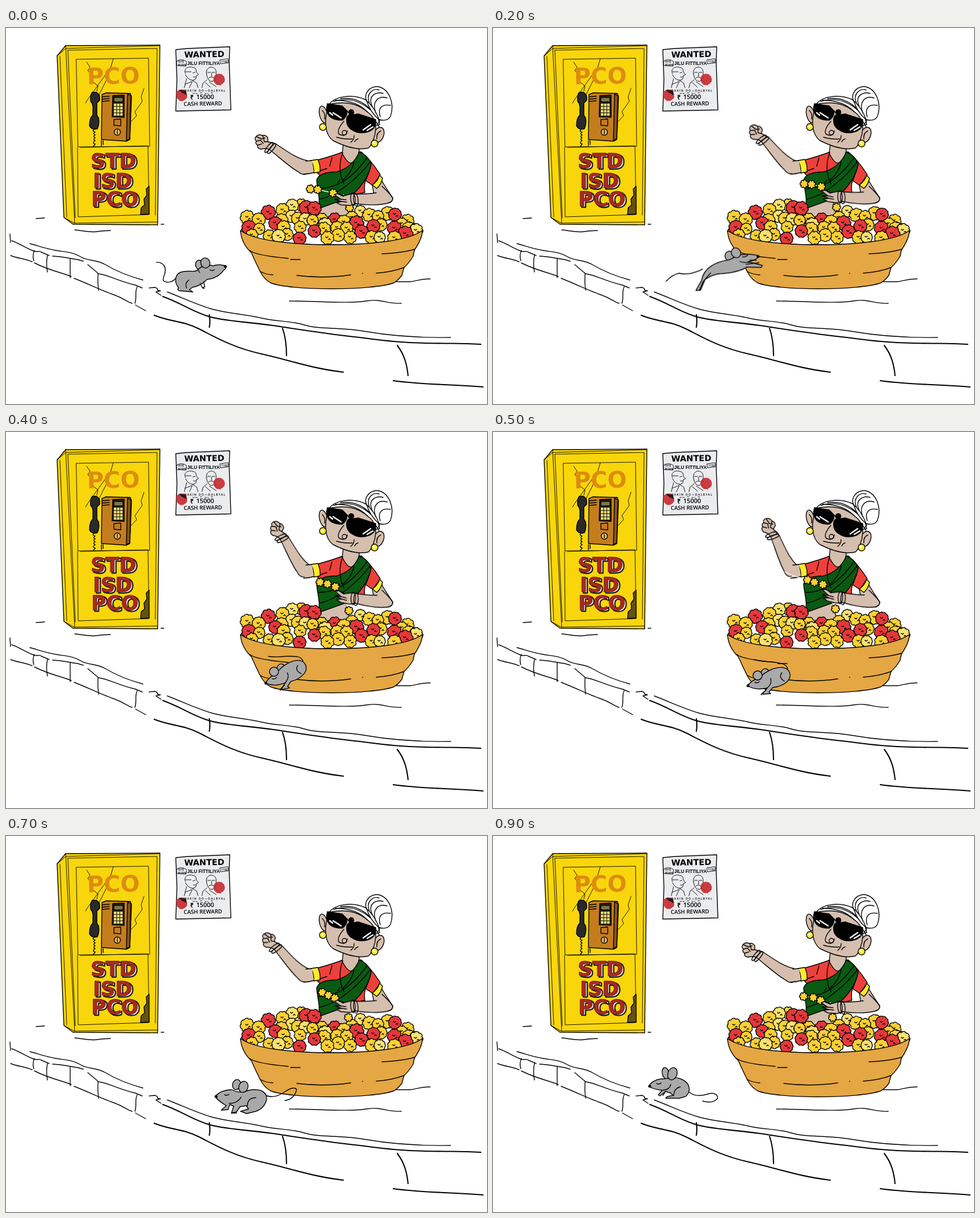
These frames come from a looping animation (847 px wide and 661 px high, 1000 ms). An HTML page:

```html
<!DOCTYPE html>
<html lang="en">
<head>
<meta charset="utf-8">
<title>Flower seller</title>
<style>
html, body { margin: 0; width: 100%; height: 100%; overflow: hidden; background: #fff; }
svg { display: block; width: 847px; height: 661px; }
path, ellipse, circle, polygon { stroke: #000; stroke-width: 1.4; stroke-linecap: round; stroke-linejoin: round; }
.line { fill: none; }
.thick { stroke-width: 2.1; }
.thin path { stroke-width: .9; }
.flat { stroke: none; }
.skin { fill: #d5beae; }
.red { fill: #ee403b; }
.green { fill: #0a5a12; }
.yellow { fill: #ffeb2a; }
.white { fill: #fff; }
.grey { fill: #a9a9a9; }
.thread { fill: none; stroke: #fff; stroke-width: 1.3; }
.sign { font: bold 36px "DejaVu Sans", sans-serif; stroke-linejoin: round; }
.hand { font-family: "Open Sans", sans-serif; font-weight: 600; }
.arm { transform-origin: 530px 244px; animation: arm 1s step-end infinite; }
.palm { transform-origin: 672px 300px; animation: palm 1s step-end infinite; }
.pose { visibility: hidden; animation: show 1s step-end infinite; animation-delay: calc(var(--i) * 100ms - 1000ms); }
@keyframes show { 0% { visibility: visible } 10%, 100% { visibility: hidden } }
@keyframes arm {
  0%, 90%, 100% { transform: rotate(0deg) }
  10%, 80% { transform: rotate(7deg) }
  20%, 70% { transform: rotate(13deg) }
  30%, 60% { transform: rotate(19.5deg) }
  40% { transform: rotate(25deg) }
  50% { transform: rotate(31deg) }
}
@keyframes palm {
  0%, 90%, 100% { transform: rotate(0deg) }
  10%, 70%, 80% { transform: rotate(1.5deg) }
  20% { transform: rotate(4deg) }
  30%, 60% { transform: rotate(7deg) }
  40% { transform: rotate(8deg) }
  50% { transform: rotate(9.5deg) }
}
</style>
</head>
<body>
<svg viewBox="0 0 847 661">
  <!-- street -->
  <g class="line">
    <path d="M42 379C60 384 70 388 88 391S118 394 131 402S160 407 175 416S215 436 241 443"/>
    <path d="M7 362L8 377M10 374C20 377 34 386 46 391S56 390 62 394L76 400M82 401C100 402 112 405 126 407L136 410M144 416L163 432C180 434 200 446 228 452L240 457" stroke-width="1.1"/>
    <path d="M8 400C20 405 36 406 46 411M50 413C80 428 100 430 115 437M120 440C150 452 170 462 190 469S215 483 222 484M228 487L246 497"/>
    <path d="M50 391Q46 400 49 409M73 400Q70 414 73 429M113 406V439M162 432Q161 447 163 461"/>
    <path d="M231 455C226 465 231 473 227 484M252 457L262 456Q267 457 267 461L272 462L264 464L273 470"/>
    <path d="M261 505C290 517 310 514 340 529S400 562 450 573S540 599 594 605" class="thick"/>
    <path d="M276 472C310 484 330 500 360 508S430 517 470 523S560 537 605 542S680 553 740 554S800 554 836 556" class="thick"/>
    <path d="M284 464C320 478 340 488 366 495S420 503 450 510S500 514 525 522S590 526 630 533S720 545 783 544"/>
    <path d="M358 504Q360 516 358 526M487 528C493 545 494 560 494 576M689 558C702 575 706 592 708 611M682 620C730 627 780 626 840 631" class="thick"/>
    <path d="M53 335L68 334M273 345H278M121 355C135 356 150 360 160 358S176 357 184 356M499 480C540 480 580 483 610 482S640 477 655 479S680 485 696 484M682 446H712C722 445 728 441 747 441"/>
  </g>

  <!-- phone booth -->
  <polygon points="105,31 271,30 267,346 118,345 102,333 90,49" fill="#f9d60b" stroke="#5b4d00"/>
  <g class="line thin">
    <path d="M105 31L121 344M90 49L105 36L271 31M102 333L120 343L267 341M109 39L122 334M109 39L266 36L263 329M95 50L107 332"/>
    <path d="M124 55L251 53L253 208L127 209ZM131 210L250 207L252 328L127 332L126 210"/>
    <path d="M142 60l6 9l-4 6l10 10l-3 8l11 9l-2 9M189 54L179 87L163 119M181 74L163 99L145 124L140 132M243 106l-5 15l2 8l-13 18l3 7l-12 13l1 9"/>
  </g>
  <text x="143" y="99" transform="rotate(-1 143 99)" style="font:bold 40px 'DejaVu Sans',sans-serif" fill="#dd8c0f">PCO</text>
  <path d="M169 117L176 114L219 115L221 121L218 196L212 199L168 196Z" fill="#c47d1d"/>
  <path d="M214 116L220 119L218 195L212 198Z" fill="#8a5414" stroke-width=".7"/>
  <path d="M188 119L208 118L208 157L187 156Z" fill="#29251a"/>
  <path d="M190 122H206V130H190Z" fill="#7d754b" stroke-width=".5"/>
  <g fill="#f5e27a" id="keys"></g>
  <path class="line" d="M169 121L182 120M169 125L182 124M169 129L182 128M190 161L202 160V172L190 171Z" stroke-width="1"/>
  <circle cx="196" cy="183" r="5.5" fill="#e7ba6a"/><path class="line" d="M196 180V186"/>
  <path d="M152 113Q148 117 149 129Q154 134 153 143V153Q147 158 147 172Q151 180 161 177Q165 168 163 158L160 153V132L165 127Q166 116 159 113Z" fill="#292929"/>
  <path class="line" d="M155 178q-4 4 2 5q-5 3 0 5q-5 3 0 5q-5 3 0 5q-6 4 0 6l-3 4M168 198v9M171 198v7" stroke-width="1.2"/>
  <g class="sign">
    <g fill="#fff" stroke="#222" stroke-width="2.4" transform="translate(3 2)" id="shade"></g>
    <g fill="#a92920" stroke="#64150f" stroke-width=".8" id="letters"></g>
  </g>
  <path d="M252 278L247 283L248 294L243 301L244 311L238 316L237 328L252 327Z" fill="#64540f" stroke-width=".8"/>

  <!-- poster -->
  <path d="M299 38L320 36L394 33L393 60L396 144L350 145L299 146L301 90Z" fill="#ebecee" stroke-width="1"/>
  <text x="314" y="52" transform="rotate(-1 314 52)" style="font:bold 14.5px 'DejaVu Sans',sans-serif">WANTED</text>
  <text x="319" y="65" style="font:bold 8.2px 'Liberation Sans',sans-serif">JILU FITTILIYA</text>
  <g class="hand">
    <text x="302" y="61" font-size="5">1970</text><text x="303" y="67" font-size="5">BORN</text>
    <text x="379" y="61" font-size="5">1150</text>
    <text x="335" y="125" font-size="11">15000</text><text x="324" y="126" font-size="11">₹</text>
    <text x="313" y="137" font-size="9.7" transform="rotate(-1 313 137)">CASH REWARD</text>
    <text x="313" y="112" font-size="5" letter-spacing="1.4">MAKIN DO—DALBYAL</text>
  </g>
  <g class="line thin">
    <path d="M300 59Q308 52 318 59L317 67L301 66ZM377 56L391 54L392 61L378 63Z"/>
    <path d="M316 80C312 72 320 67 328 69Q336 70 335 77L339 82L335 84Q336 91 329 92Q320 91 316 82M329 79l4-1M330 86h4M318 89L314 105M328 92L336 97L338 105M315 99L328 94L323 105M316 77H326"/>
    <path d="M353 80C351 65 372 65 370 80Q370 94 361 94Q354 91 353 80M355 78h5M363 78h5M362 79v6M357 88q5-4 9 0M354 91L347 97L345 105M358 95L370 103M351 96L360 104M368 92L378 101"/>
    <path d="M329 115h9M342 114h4M350 115h6M361 114h5" stroke-dasharray="3 2"/>
  </g>
  <g class="flat">
    <path class="flat" d="M366 86Q370 79 379 81Q387 85 385 94Q380 102 371 100Q363 94 366 86Z" fill="#c8292d" opacity=".9"/>
    <path class="flat" d="M300 113Q305 106 314 109Q320 114 319 122Q314 130 306 128Q298 123 300 113Z" fill="#c8292d" opacity=".9"/>
    <path class="flat" d="M304 109L317 110L318 118L310 114Z" fill="#26181a"/>
  </g>

  <!-- basket inside -->
  <path class="white" d="M413 358C418 338 480 326 573 326S728 338 733 358Q700 381 573 381T413 358Z"/>

  <!-- woman -->
  <path class="skin" d="M553 305L598 300L609 344L540 344Z"/>
  <path class="skin" d="M658 262C668 280 676 291 681 299Q681 306 674 307L650 305L645 276Z"/>
  <path class="red" d="M549 232Q575 225 596 217L626 218Q645 235 659 258L646 277L633 268Q630 279 632 289L618 292L575 275L549 256Z"/>
  <path class="yellow" d="M537 233L549 231Q554 241 553 253L542 255Q543 243 537 233Z"/>
  <path class="yellow" d="M658 259L663 264Q661 275 653 282L645 276Q654 270 658 259Z"/>
  <path class="skin" d="M594 204L592 220Q602 240 609 237Q620 231 622 215V208Z"/>
  <path class="green" d="M622 218Q639 225 643 240C639 262 622 285 602 299L549 318C555 301 548 285 547 267C551 254 570 253 582 253C601 248 615 235 622 218Z"/>
  <path class="line" d="M552 301C585 294 620 263 641 236M551 282C590 282 618 253 635 229M574 228L570 243M565 247L553 251M640 251L634 267"/>
  <path class="line" d="M593 219C586 238 588 256 592 268M613 236Q607 258 592 268M588 267l-4 5M593 268l2 6" stroke-width="1.7"/>

  <ellipse class="skin" cx="559" cy="152" rx="7" ry="15" transform="rotate(-13 559 152)"/>
  <path class="line" d="M557 145Q563 151 561 160"/>
  <ellipse class="skin" cx="656" cy="188" rx="9" ry="14" transform="rotate(22 656 188)"/>
  <path class="line" d="M660 181Q652 184 653 195"/>
  <path class="skin" d="M567 139C560 164 561 187 576 198C594 207 618 216 638 211C645 205 650 191 651 177L653 150L620 126L580 127Z"/>
  <path class="white" d="M569 134C580 120 609 115 633 126Q651 136 658 170L650 171Q650 157 637 148C620 133 597 128 569 134Z"/>
  <path class="line" d="M577 129Q610 119 638 141T654 168M589 124Q624 120 647 149M580 127Q617 127 637 148" stroke-width="1.1"/>
  <path class="white" d="M635 128C629 115 641 102 655 103C675 107 685 133 677 155Q672 165 657 161Q642 149 635 128Z"/>
  <path class="line" d="M640 132C633 116 646 105 657 109M646 140C635 119 652 111 664 115M651 149C644 130 655 118 671 123M659 156C654 141 662 133 677 136M633 126Q649 139 657 161" stroke-width="1.2"/>
  <path d="M566 133L592 137L601 146Q600 158 592 162Q574 162 568 153Q562 146 566 133Z"/>
  <path d="M602 154L620 151L651 161Q653 176 639 182Q622 188 609 179Q598 172 600 158Z"/>
  <path class="line" d="M598 146Q603 145 605 154M650 162L657 174" stroke-width="4"/>
  <path class="line" d="M570 149L575 153M576 149L590 158M629 179L642 170M636 180L646 174" style="stroke:#fff;stroke-width:2.4"/>
  <circle cx="608" cy="148" r="4.5"/>
  <path class="skin" d="M595 164C587 173 580 186 590 188Q599 191 601 181"/>
  <circle class="line" cx="596" cy="184" r="4" stroke-width="2"/>
  <path class="line" d="M582 192Q597 196 610 195M607 201Q613 197 613 189M614 200Q616 196 620 195"/>
  <circle class="yellow" cx="558" cy="174" r="6"/><circle class="yellow" cx="649" cy="203" r="6"/>
  <circle class="white flat" cx="557" cy="173" r="2"/><circle class="white flat" cx="648" cy="202" r="2"/>

  <!-- raised arm -->
  <g class="arm">
    <path class="skin" d="M461 200L474 203C490 213 508 228 530 233L537 244L530 256Q523 260 515 253C500 245 480 226 463 213Q456 211 449 213Q442 212 443 206Q438 203 441 199Q436 195 441 190Q446 186 451 189Q457 187 461 193Z"/>
    <path class="line" d="M441 199L448 197L453 203M443 206L450 204M441 191L450 195L456 193M452 189L455 200L461 200"/>
    <ellipse class="line" cx="463" cy="210" rx="3" ry="11" transform="rotate(38 463 210)"/>
    <ellipse class="line" cx="468" cy="212" rx="3" ry="11" transform="rotate(40 468 212)"/>
  </g>
  <path class="skin flat" d="M526 234L539 234L542 254L526 256Z"/>
  <path class="line" d="M528 234L538 233M524 257Q533 257 542 254"/>

  <g id="heap"></g>
  <g id="garland"></g>

  <!-- lower arm -->
  <g class="palm">
    <path class="skin" d="M676 307C655 313 632 311 616 309L606 312L590 311L582 307L591 305L579 301L590 301L578 293L584 291L595 295L606 292Q612 291 618 292Q640 292 657 289"/>
    <path class="skin flat" d="M652 286L671 289L676 306L655 307Z"/>
    <path class="line" d="M590 301L599 302M591 305L600 306M584 291L594 296"/>
    <ellipse class="line" cx="611" cy="301" rx="4" ry="11" transform="rotate(-6 611 301)"/>
    <ellipse class="line" cx="616" cy="302" rx="4" ry="11" transform="rotate(-6 616 302)"/>
  </g>
  <path class="line" d="M662 278C670 286 677 292 681 299Q681 306 674 307"/>

  <!-- basket front -->
  <path fill="#e5a743" d="M413 356C437 374 505 381 573 381S710 374 733 356Q734 368 719 391L717 401Q710 413 701 421L697 435Q690 444 683 448C645 462 500 462 466 448Q455 442 448 429Q440 413 432 395Q414 378 413 356Z"/>
  <path class="line" d="M429 391Q440 400 497 405M501 407H518M512 435Q560 441 607 434M662 397Q700 395 719 389M652 431Q680 429 701 421M448 428Q456 433 470 434M628 431v.5"/>
  <g id="mice"></g>
</svg>
<script>
const $ = id => document.getElementById(id);
const path = (d, cls, extra = '') => `<path class="${cls}" d="${d}" ${extra}/>`;

// Scalloped blossom outline
function bloom(x, y, r, color, lobes = 8, turn = 0) {
  let d = '';
  for (let k = 0; k <= lobes; k++) {
    const a = turn + k / lobes * Math.PI * 2;
    const px = (x + r * .84 * Math.cos(a)).toFixed(1), py = (y + r * .84 * Math.sin(a)).toFixed(1);
    d += k ? `A${r * .36} ${r * .36} 0 0 1 ${px} ${py}` : `M${px} ${py}`;
  }
  return path(d + 'Z', '', `fill="${color}"`);
}

const tones = { gold: '#fbd034', pale: '#fbe16f', red: '#e4383b' };
const spots = {
  gold: '425 333 445 337 446 353 487 320 520 311 485 338 489 350 495 363 464 366 518 350 514 335 560 353 556 336 566 369 583 351 585 364 600 352 609 333 640 329 655 331 672 326 660 346 606 368 644 368 684 369 707 339 709 353 721 354 697 344 433 364 540 338 595 341',
  pale: '504 312 503 331 527 336 624 322 658 368 480 366 722 356 562 346',
  red: '462 324 428 351 529 316 543 317 474 343 517 370 543 357 579 337 617 343 626 358 647 348 685 328 684 352 703 362'
};
const heap = Object.entries(spots).flatMap(([tone, s]) => {
  const n = s.split(' ').map(Number), list = [];
  for (let k = 0; k < n.length; k += 2) list.push({ x: n[k], y: n[k + 1], tone });
  return list;
}).sort((a, b) => a.y - b.y);
$('heap').innerHTML = heap.map(({ x, y, tone }, k) =>
  bloom(x, y, (tone === 'red' ? 12.2 : 11.2) + k * 7 % 5 * .5, tones[tone], 8 + k % 3, k) +
  path(`M${x - 3} ${y - 2}q2 3 4 0M${x + 2} ${y + 3}q2 -3 3 0`, 'line', 'stroke-width=".6"')).join('');

const pose = (i, body) => `<g class="pose" style="--i:${i}">${body}</g>`;

// Three strung blossoms and the loose one, per step
const strings = [
  [536, 283, 549, 284, 576, 290, 605, 316], [544, 279, 558, 280, 577, 281, 605, 314],
  [548, 274, 561, 275, 578, 279, 605, 315], [552, 269, 565, 270, 579, 276, 605, 318],
  [553, 264, 566, 267, 580, 272, 604, 314], [554, 260, 566, 264, 581, 268, 603, 311],
  [547, 269, 560, 270, 580, 275, 600, 313], [557, 275, 568, 280, 579, 285, 603, 319],
  [552, 279, 566, 282, 578, 287, 600, 319], [547, 282, 564, 284, 577, 289, 598, 319]
];
$('garland').innerHTML = strings.map((p, i) => {
  let s = path(`M${p[0]} ${p[1]}L${p[2]} ${p[3]}L${p[4]} ${p[5]}M594 293L${p[6]} ${p[7]}`, 'thread');
  if (i === 5) s += path('M514 246Q535 256 554 259', 'thread');
  for (let k = 0; k < 8; k += 2) s += bloom(p[k], p[k + 1], 6.6, tones.gold, 7, k);
  return pose(i, s);
}).join('');

// Mouse: tail, far ear, body, near ear, details, nose
function mouse({ tail, ears, body, marks, nose }) {
  const ear = ([x, y, rx, ry, a]) => `<ellipse class="grey" cx="${x}" cy="${y}" rx="${rx}" ry="${ry}" transform="rotate(${a} ${x} ${y})"/>`;
  return path(tail, 'line') + ear(ears[0]) + path(body, 'grey') + ear(ears[1]) +
    path(marks, 'line') + `<circle cx="${nose[0]}" cy="${nose[1]}" r="1.8"/>`;
}
const sit = mouse({
  tail: 'M299 440C290 450 280 447 277 444C275 438 285 428 278 417Q272 411 265 412',
  ears: [[341, 417, 7, 9, -25], [351, 413, 8, 9, -20]],
  body: 'M304 457C295 445 297 430 313 428C325 426 333 430 338 425C345 418 354 415 364 418Q378 414 388 419Q388 423 384 425C376 436 364 441 354 442Q344 453 328 456L323 460L329 464L306 462Q300 460 304 457Z',
  marks: 'M359 425q4 3 8 0M342 449l4 8l3 1M348 446l2 9l-3 1M318 457Q314 449 322 443M338 425L341 430', nose: [386, 419] });
const rear = mouse({
  tail: 'M342 447C325 452 310 447 302 443C296 440 298 434 290 431',
  ears: [[393, 396, 6, 9, -30], [403, 392, 6, 9, -12]],
  body: 'M347 458C337 446 345 428 360 423C372 418 382 418 387 411C390 402 400 400 408 401Q424 400 433 408Q432 413 415 417Q402 418 398 428C394 442 380 452 370 457L364 460L367 462L345 462Z',
  marks: 'M410 404q4 1 9-2M391 424l9 1l5 3M393 419l11 2l8 6M388 413Q393 419 400 418M350 460Q356 450 368 458', nose: [432, 409] });
const leap = mouse({
  tail: 'M385 411C365 417 352 415 343 411Q331 411 318 421',
  ears: [[436, 397, 8, 9, -15], [448, 393, 8, 9, -25]],
  body: 'M380 430C387 410 408 403 430 403C438 404 446 398 456 398Q472 398 486 405Q483 412 466 412L490 423L487 426L463 421C448 427 425 426 410 424Q395 425 386 430L375 447L367 446Z',
  marks: 'M458 402q6 2 10-2M452 409Q460 414 469 413M398 420L382 433L373 447M470 410l11 2M462 416L485 417', nose: [485, 406] });
const land = mouse({
  tail: 'M519 417C518 407 505 406 490 404Q475 404 460 400',
  ears: [[479, 424, 7, 8, 20], [466, 428, 8, 8, -20]],
  body: 'M448 446Q456 436 469 432C480 421 495 413 510 414C523 416 527 428 519 438Q508 448 493 449L486 457L489 460L474 461L483 450Q463 455 448 446Z',
  marks: 'M461 440q4 2 8-1M483 450Q492 442 489 433M513 438Q502 431 509 423M481 454l-7 5l-2 3', nose: [449, 446] });
const walk = mouse({
  tail: 'M499 437C515 428 518 420 510 410C500 404 506 400 518 398M511 399V410',
  ears: [[412, 427, 8, 9, -15], [434, 432, 8, 8, 20]],
  body: 'M396 445Q407 436 420 436C430 431 448 434 460 433C478 428 496 432 499 444Q499 452 493 458L498 465L480 467L473 461Q455 466 441 464L435 470L421 473L431 464L424 457L413 461L401 459L413 455Q400 451 396 445Z',
  marks: 'M415 441q5 2 9-1M425 457Q437 456 445 445M474 460Q472 449 484 444M421 472h11', nose: [398, 445] });
const trot = mouse({
  tail: 'M457 456C470 461 480 457 492 449C505 440 514 443 511 448Q507 463 491 465',
  ears: [[406, 437, 7, 9, 18], [418, 441, 8, 10, 20]],
  body: 'M368 458Q379 446 398 446C408 452 418 451 428 447C446 443 460 449 459 463Q455 479 440 484L424 488L413 484L427 480L423 474L412 476L406 485L397 487L401 475L394 472L391 481L379 482L388 474Q374 466 368 458Z',
  marks: 'M385 455q4 2 8-1M393 470Q408 470 414 459M425 475Q425 460 440 460M397 487h9', nose: [370, 458] });
const rest = mouse({
  tail: 'M345 450C355 458 365 457 377 454C390 449 397 456 395 462Q386 471 369 466',
  ears: [[304, 417, 6, 10, -12], [316, 418, 8, 11, 20]],
  body: 'M274 440Q281 429 296 427C306 428 319 421 333 428C348 435 349 450 339 458L328 461L304 461L307 458L317 456L313 452L304 449L294 457L291 455L298 447Q284 446 274 440Z',
  marks: 'M288 435q4 3 8-1M299 447Q311 446 313 437M318 457Q319 443 330 441M304 449L299 456', nose: [276, 440] });
const moved = (shape, t) => `<g transform="${t}">${shape}</g>`;
$('mice').innerHTML = [
  sit, rear, moved(leap, 'translate(-16 5) rotate(-10 430 415)'), leap,
  moved(land, 'translate(6 -10) rotate(-8 490 430)'), land, walk, trot,
  moved(trot, 'translate(-48 -10)'), rest
].map((m, i) => pose(i, m)).join('');

const sign = [['STD', 149, 246], ['ISD', 153, 281], ['PCO', 150, 313]]
  .map(([s, x, y]) => `<text x="${x}" y="${y}">${s}</text>`).join('');
$('shade').innerHTML = $('letters').innerHTML = sign;

let keys = '';
for (let k = 0; k < 12; k++) keys += `<rect x="${190 + k % 3 * 5.5}" y="${133 + (k / 3 | 0) * 5.6}" width="4.3" height="4.3"/>`;
$('keys').innerHTML = keys;
</script>
</body>
</html>
```
